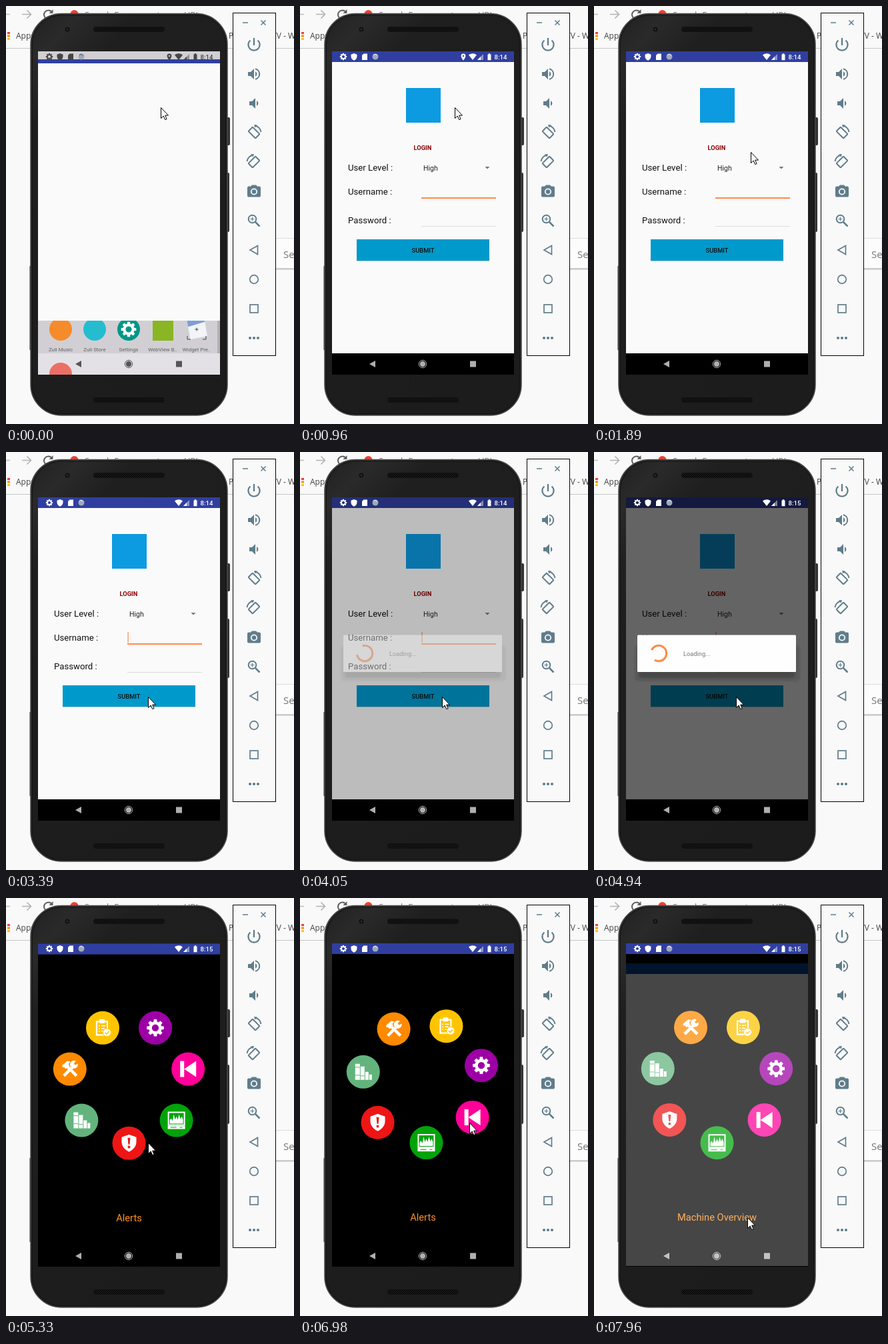
An HTML page that plays this animation: 432x627 px, repeating every 8 s.

```html
<!DOCTYPE html>
<html lang="en">
<head>
<meta charset="utf-8">
<title>Login and menu demo</title>
<style>
html, body { margin: 0; width: 100%; height: 100%; overflow: hidden; background: #f9f9f9; }
svg { display: block; width: 432px; height: 627px; }
text { font-family: Roboto, sans-serif; }
.ui { font-family: "Open Sans", "Noto Sans", sans-serif; }
.mid { text-anchor: middle; }
.line { fill: none; stroke: #607d8b; stroke-width: 2; }
.solid { fill: #607d8b; }
</style>
</head>
<body>
<svg viewBox="0 0 432 627">
  <defs>
    <linearGradient id="shell" x1="0" y1="0" x2=".5" y2="1">
      <stop offset="0" stop-color="#202020"/><stop offset=".1" stop-color="#2a2a2a"/>
      <stop offset=".22" stop-color="#1f1f1f"/><stop offset="1" stop-color="#1c1c1c"/>
    </linearGradient>
    <pattern id="mesh" width="3" height="3" patternUnits="userSpaceOnUse">
      <rect width="3" height="3" fill="#1b1b1b"/><rect width="1.5" height="1.5" fill="#050505"/>
      <rect x="1.5" y="1.5" width="1.5" height="1.5" fill="#080808"/>
    </pattern>
    <clipPath id="screenClip"><rect x="48" y="68" width="273" height="485"/></clipPath>
    <clipPath id="appClip"><rect id="reveal" x="48" width="273"/></clipPath>
    <clipPath id="shelfClip"><rect x="48" y="472" width="273" height="81"/></clipPath>
    <filter id="soft" x="-10%" y="-30%" width="120%" height="160%"><feGaussianBlur stdDeviation="1.5"/></filter>
  </defs>

  <!-- browser behind the phone -->
  <rect width="432" height="627" fill="#f9f9f9"/>
  <g fill="none" stroke="#8c8c8c" stroke-width="1.7">
    <path d="M0 12.5h6" stroke="#c4c4c4"/>
    <path d="M24 12.5h13M31.500 6.500l6 6-6 6" stroke="#b4b4b4"/>
    <path d="M69 9.500a6.500 6.500 0 1 0 1 4" stroke="#606060" stroke-width="2"/>
    <path d="M70.500 5v6h-6z" fill="#606060" stroke="none"/>
  </g>
  <circle cx="102.500" cy="12" r="6" fill="#ea4335"/>
  <text class="ui" x="118" y="18" font-size="13" fill="#777">Search Fennox or type a URL</text>
  <path d="M2 39h4v3H2z" fill="#ea4335"/><path d="M2 43.500h4v3H2z" fill="#fb8c00"/><path d="M2 48h4v3H2z" fill="#fbc02d"/>
  <g class="ui" font-size="12" fill="#444">
    <text class="ui" x="15" y="49">Apps</text><text class="ui" x="334" y="49">P</text><text class="ui" x="399" y="49">TV - W</text>
  </g>
  <path d="M0 63.500h432" stroke="#c6c6c6"/>
  <path d="M400 348.500h32v45h-32" fill="#fcfcfc" stroke="#dcdcdc"/>
  <path d="M400 394.500h32" stroke="#c4c4c4" stroke-width="2"/>
  <text class="ui" x="416" y="378" font-size="15" fill="#757575">Search</text>

  <!-- phone body -->
  <path d="M331 167h3q2 0 2 2v38q0 2-2 2h-3zM331 250h2q2 0 2 2v85q0 2-2 2h-2zM35.500 390h3v126h-3z" fill="#333"/>
  <rect x="37" y="11.500" width="295" height="602.500" rx="46" fill="url(#shell)" stroke="#494949" stroke-width="1.500"/>
  <rect x="39.500" y="14" width="290" height="597.500" rx="43.500" fill="none" stroke="#151515"/>
  <rect x="131" y="31" width="107" height="8" rx="4" fill="url(#mesh)"/>
  <rect x="131" y="587" width="107" height="8" rx="4" fill="url(#mesh)"/>
  <circle cx="92" cy="35" r="3.500" fill="#111"/><circle cx="92" cy="35" r="1.500" fill="#2b2b35"/>

  <g clip-path="url(#screenClip)">
    <!-- launcher -->
    <rect x="48" y="68" width="273" height="485" fill="#d1cfd3"/>
    <rect x="48" y="521" width="273" height="32" fill="#e3e1e5"/>
    <rect x="317" y="472" width="4" height="49" fill="#b3b1b6"/>
    <g id="shelf" clip-path="url(#shelfClip)"></g>

    <!-- login -->
    <g clip-path="url(#appClip)"><g id="app">
      <rect x="48" y="68" width="273" height="500" fill="#fafafa"/>
      <rect x="48" y="60" width="273" height="24" fill="#303f9f"/>
      <rect x="48" y="521" width="273" height="40"/>
      <g id="login">
        <rect x="159" y="123" width="52" height="52" fill="#0c9ae0"/>
        <text class="mid" x="184" y="216" font-size="9.300" font-weight="700" fill="#8b0000">LOGIN</text>
        <g font-size="13.200" fill="#111">
          <text x="72" y="246.500">User Level :</text><text x="72" y="283">Username :</text><text x="72" y="326">Password :</text>
        </g>
        <text x="185" y="246.500" font-size="10.500" fill="#222">High</text>
        <path d="M277.500 241h7l-3.500 3.500z" fill="#777"/>
        <rect x="182" y="287" width="112" height="2" fill="#ff8a48"/>
        <rect x="182" y="330" width="112" height="1" fill="#dcdcdc"/>
        <rect id="caret" x="182.500" y="270" width="1.200" height="16" fill="#ff8a48"/>
        <rect x="85" y="351" width="199" height="32" fill="#ccc"/>
        <rect x="85" y="350" width="199" height="32" fill="#0099cc"/>
        <text class="mid" x="184.500" y="369.500" font-size="9.300" font-weight="500" fill="#111">SUBMIT</text>
      </g>
    </g></g>

    <rect id="dim" x="48" y="68" width="273" height="485"/>
    <g id="dialog">
      <rect x="61" y="290" width="248" height="54" rx="6" opacity=".1" filter="url(#soft)"/>
      <rect x="67" y="290" width="234" height="49" rx="5" opacity=".18" filter="url(#soft)"/>
      <rect x="65" y="274.500" width="238" height="55.500" rx="1.500" fill="#fefefe"/>
      <path id="spin" fill="none" stroke="#ff8a48" stroke-width="3"/>
      <text x="134" y="305.500" font-size="9.300" fill="#757575">Loading...</text>
    </g>

    <!-- wheel menu -->
    <g id="menu">
      <rect x="48" y="68" width="273" height="500"/>
      <rect x="48" y="68" width="273" height="16" fill="#303f9f"/>
      <g id="wheel"></g>
      <text id="label" class="mid" x="184.500" y="484.300" font-size="14.700" fill="#ff9020"></text>
    </g>

    <g id="nav">
      <path d="M104 537l9-5v10z"/><rect x="255" y="532.500" width="9" height="9"/>
      <circle cx="184" cy="537" r="4.200"/><circle cx="184" cy="537" r="5.700" fill="none" stroke="currentColor" stroke-width="1"/>
    </g>

    <!-- next page fading in -->
    <g id="next" opacity=".28">
      <rect x="48" y="98" width="273" height="16" fill="#0a4a9f"/>
      <rect x="48" y="114" width="273" height="438" fill="#fafafa"/>
    </g>

    <g id="status" fill="currentColor">
      <path id="cog"/>
      <path d="M81 71l4.500 1.700v3c0 3-2 5-4.500 6-2.500-1-4.500-3-4.500-6v-3z"/>
      <path d="M95.500 71.500h5.500v9.500h-8v-7z"/>
      <circle cx="113" cy="76" r="4.500" fill="#9fa8bd"/><path d="M110 73.500a4 4 0 0 1 6 1" fill="none" stroke="currentColor"/>
      <path id="pin" fill-rule="evenodd" d="M245 71.500a3.400 3.400 0 0 1 3.400 3.400c0 2.400-3.400 6.600-3.400 6.600s-3.400-4.200-3.400-6.600a3.400 3.400 0 0 1 3.400-3.400zm0 2.200a1.200 1.200 0 1 0 .01 0z"/>
      <path d="M253 73.500a9 9 0 0 1 12 0l-6 7.500z"/>
      <path d="M275 72v9h-9z" opacity=".45"/><path d="M271 76v5h-5z"/>
      <path d="M281.500 72.500h1.300v-1.200h2.400v1.200h1.300v8.700h-5z"/>
      <text id="clock" x="291.500" y="79.800" font-size="9.600" font-weight="500"></text>
    </g>
  </g>

  <!-- emulator tools -->
  <rect x="340.500" y="10.500" width="64" height="514" fill="#f9f9f9" stroke="#000"/>
  <path d="M355 25h8M382.500 21.500l7 7m0-7l-7 7" class="line" style="stroke-width:1.500"/>
  <g id="tools"></g>

  <path id="mouse" d="M.5.5v16l3.700-3.500 2.500 5.600 2.400-1-2.400-5.500h4.800z" fill="#fff" stroke="#000"/>
</svg>
<script>
const $ = id => document.getElementById(id);
const put = (id, html) => { $(id).innerHTML = html; };
const LOOP = 8000, SLOT = 360 / 7;

const ticks = [0, 130, 280, 560, 690, 830, 960, 1090, 1230, 1360, 1500, 1620,
  1890, 2030, 2160, 2300, 2430, 2840, 2970, 3240, 3390,
  4050, 4180, 4310, 4440, 4560, 4690, 4820, 4940, 5210, 5330, 5480,
  5760, 5890, 6030, 6160, 6300, 6830, 6980, 7110, 7260, 7550, 7680, 7960];

const mousePath = [[0, 232, 152], [1090, 232, 152], [1500, 241, 204], [1620, 240, 206],
  [1890, 235, 219], [2430, 213, 377], [2840, 213, 376], [3390, 213, 367], [5480, 213, 367],
  [6160, 254, 334], [6300, 254, 337], [7110, 254, 337], [7680, 230, 479]];
const turnPath = [[0, 0], [6700, 0], [6830, 25], [6980, 48.3], [7110, SLOT]];

function at(path, t) {
  let i = path.findIndex(p => p[0] > t);
  if (i < 0) return path[path.length - 1].slice(1);
  const a = path[i - 1], b = path[i], k = (t - a[0]) / (b[0] - a[0]);
  return a.slice(1).map((v, j) => v + (b[j + 1] - v) * k);
}
const clamp = v => Math.min(1, Math.max(0, v));
const polar = (r, deg) => [r * Math.cos(deg * Math.PI / 180), r * Math.sin(deg * Math.PI / 180)];

// cog with eight teeth and a round hole
function cog(x, y, r) {
  let d = "";
  for (let i = 0; i < 8; i++) {
    [[-16, .74], [-10, 1], [10, 1], [16, .74]].forEach(([a, k]) => {
      const [px, py] = polar(r * k, i * 45 + a);
      d += (d ? "L" : "M") + (x + px).toFixed(2) + " " + (y + py).toFixed(2);
    });
  }
  const h = r * .4;
  return `${d}ZM${x - h} ${y}a${h} ${h} 0 1 0 ${2 * h} 0a${h} ${h} 0 1 0 ${-2 * h} 0Z`;
}
$("cog").setAttribute("d", cog(65, 76, 5.3));
$("cog").setAttribute("fill-rule", "evenodd");

put("shelf", `
  <circle cx="82" cy="485" r="17" fill="#f68b2c"/>
  <circle cx="133" cy="485" r="17" fill="#25bcd0"/>
  <circle cx="184" cy="485" r="17" fill="#009688"/>
  <path d="${cog(184, 485, 11.5)}" fill="#fff" fill-rule="evenodd"/>
  <rect x="220" y="470" width="31" height="32" fill="#8ab525"/>
  <g transform="rotate(-10 286 485)"><rect x="274" y="472" width="26" height="26" fill="#f2f4f8"/>
    <path d="M274 470h26v6l-26 3z" fill="#7d9fd6"/></g>
  <path d="M286 482.500v5m-2.500-2.500h5M272 495v5h5m18 0h5v-5" stroke="#444" fill="none"/>
  <circle cx="82" cy="552" r="17" fill="#ec6f66"/>` +
  ["Zuli Music", "Zuli Store", "Settings", "WebView B..", "Widget Pre.."].map((s, i) =>
    `<text class="mid" x="${82 + i * 51}" y="517.500" font-size="7.900" fill="#626262">${s}</text>`).join(""));

const speaker = '<path class="solid" d="M-9-3h4l5-5v16l-5-5h-4z"/>';
const rotate = `<g transform="rotate(-45)"><rect class="line" x="-4.500" y="-7.500" width="9" height="15" rx="1"/></g>
  <path class="line" d="M1-10.500a11 11 0 0 1 9.500 9.500"/><path class="solid" d="M0-12l5 .5-3.500 4z"/>`;
const tools = [
  '<path class="line" style="stroke-width:2.300" d="M0-10v11M-5.600-6.500a8.600 8.600 0 1 0 11.200 0"/>',
  speaker + '<path class="solid" d="M2-4a4.500 4.500 0 0 1 0 8z"/><path class="line" d="M2-7.800a8 8 0 0 1 0 15.600"/>',
  `<g transform="translate(2)">${speaker}<path class="solid" d="M2-4a4.500 4.500 0 0 1 0 8z"/></g>`,
  rotate,
  `<g transform="scale(-1 1)">${rotate}</g>`,
  `<path class="solid" d="M-3-9.500h6l2 2h3q2 0 2 2v12q0 2-2 2h-16q-2 0-2-2v-12q0-2 2-2h3z"/>
   <circle cy=".5" r="4.200" fill="#607d8b" stroke="#f9f9f9" stroke-width="1.800"/>`,
  '<circle class="line" cx="-2.500" cy="-2.500" r="5.800"/><path class="line" d="M2 2l6.500 6.500" style="stroke-width:2.500"/><path class="line" style="stroke-width:1.200" d="M-2.500-5.500v6m-3-3h6"/>',
  '<path class="line" style="stroke-width:1.700" d="M-6 0l11.500-6.500v13z"/>',
  '<circle class="line" style="stroke-width:1.700" r="6.300"/>',
  '<rect class="line" style="stroke-width:1.700" x="-6" y="-6" width="12" height="12"/>',
  '<circle class="solid" cx="-6" r="2.100"/><circle class="solid" r="2.100"/><circle class="solid" cx="6" r="2.100"/>'
];
put("tools", tools.map((s, i) => `<g transform="translate(372 ${58 + i * 44})">${s}</g>`).join(""));

// wheel buttons, clockwise from the bottom
const buttons = [
  ["#ee1515", '<path d="M0-13l11 4v7c0 7-5 12-11 15-6-3-11-8-11-15v-7z" fill="#fff"/><path d="M-2-8h4l-1 10h-2zM-1.700 4h3.400v3.400h-3.400z" fill="#ee1515"/>'],
  ["#62b47c", '<path d="M-12-12h7v24h-7zM-4-8h6v20h-6zM3 0h5v12h-5zM9 4h4v8h-4z" fill="#fff"/><path d="M-12 5h7M-4 6h6M-12-7h7" stroke="#62b47c"/>'],
  ["#ff8a00", `<path d="M-9 10L6-5M-5-5L10 10" stroke="#fff" stroke-width="4.500"/>
    <path d="M-12-5l8-7 5 1-3 3 1 3-5 5-3-3-1 1z" fill="#fff"/>
    <path d="M9-12a6 6 0 1 0 3 4l-4 2-2-2z" fill="#fff"/>`],
  ["#ffc400", `<path d="M-9-9.500H7v20H-9z" fill="none" stroke="#fff" stroke-width="2.200"/><path d="M-5-13h8v6h-8z" fill="#fff"/>
    <path d="M-6-3h2m2 0h6M-6 1h2m2 0h5M-6 5h2m2 0h3" stroke="#fff" stroke-width="1.600"/>
    <circle cx="6.500" cy="7" r="6" fill="#fff" stroke="#ffc400"/><path d="M3.500 7l2.200 2.200 4-4" fill="none" stroke="#ffc400" stroke-width="1.600"/>`],
  ["#9c00a5", `<path d="${cog(0, 0, 13)}" fill="#fff" fill-rule="evenodd"/>`],
  ["#ff0099", '<path d="M-12-12h6v24h-6zM-6 0l18-12v24z" fill="#fff"/>'],
  ["#00a30a", `<path d="M-12-12h24v19h-24z" fill="none" stroke="#fff" stroke-width="2"/>
    <path d="M-10 5v-5l2-3 2 4 2-10 2 8 2-5 2 5 2-8 2 7 2-4 2 5v6z" fill="#fff"/>
    <path d="M-13 8h26v5h-26z" fill="#fff"/><path d="M-9 10.500h9m5 0h4" stroke="#00a30a"/>`]
];
put("wheel", buttons.map(([c, icon]) => `<g><circle r="25" fill="${c}"/>${icon}</g>`).join(""));
const seats = [...$("wheel").children];

const show = (id, o) => $(id).setAttribute("opacity", o);
const shift = (id, x, y) => $(id).setAttribute("transform", `translate(${x} ${y})`);

function draw(now) {
  const t = ticks.filter(k => k <= now).pop();

  const top = t < 130 ? 80 : t < 280 ? 71 : 68, bottom = t < 130 ? 472 : t < 280 ? 514 : 553;
  $("reveal").setAttribute("y", top);
  $("reveal").setAttribute("height", bottom - top);
  shift("app", 0, t < 130 ? 2 : t < 280 ? .7 : 0);

  show("login", t >= 560 ? 1 : 0);
  show("caret", t < 890 || t >= 3390 || Math.floor((t - 890) / 500) % 2 ? 1 : 0);
  $("status").style.color = t < 130 ? "#454545" : "#fff";
  show("pin", t < 1890 ? 1 : 0);
  $("clock").textContent = t < 4440 ? "8:14" : "8:15";
  const g = t < 280 ? 85 : Math.round(70 + 105 * clamp((t - 280) / 410));
  $("nav").style.color = `rgb(${g},${g},${g})`;
  $("nav").setAttribute("fill", "currentColor");

  const fade = t < 4050 ? 0 : t < 5210 ? clamp((t - 3960) / 220) : 0;
  show("dim", .6 * fade);
  show("dialog", fade);
  const turn = (t - 4560) * .35;
  const [ax, ay] = polar(11.7, 72 + turn), [bx, by] = polar(11.7, 348 + turn);
  $("spin").setAttribute("d", `M${97 + ax} ${302 + ay}A11.7 11.7 0 1 1 ${97 + bx} ${302 + by}`);

  show("menu", t < 5210 ? 0 : t < 5330 ? .5 : 1);
  shift("menu", 0, t < 5330 ? 14 : t < 5480 ? .6 : 0);
  const [spin] = at(turnPath, t);
  seats.forEach((s, i) => {
    const [x, y] = polar(91, 90 + i * SLOT + spin);
    s.setAttribute("transform", `translate(${184.5 + x} ${276.2 + y})`);
  });
  $("label").textContent = t < 7110 ? "Alerts" : "Machine Overview";
  show("next", t >= 7960 ? .28 : 0);

  const [mx, my] = at(mousePath, t);
  shift("mouse", Math.round(mx), Math.round(my));
}

const start = performance.now();
function frame() {
  draw((performance.now() - start) % LOOP);
  requestAnimationFrame(frame);
}
frame();
</script>
</body>
</html>
```
